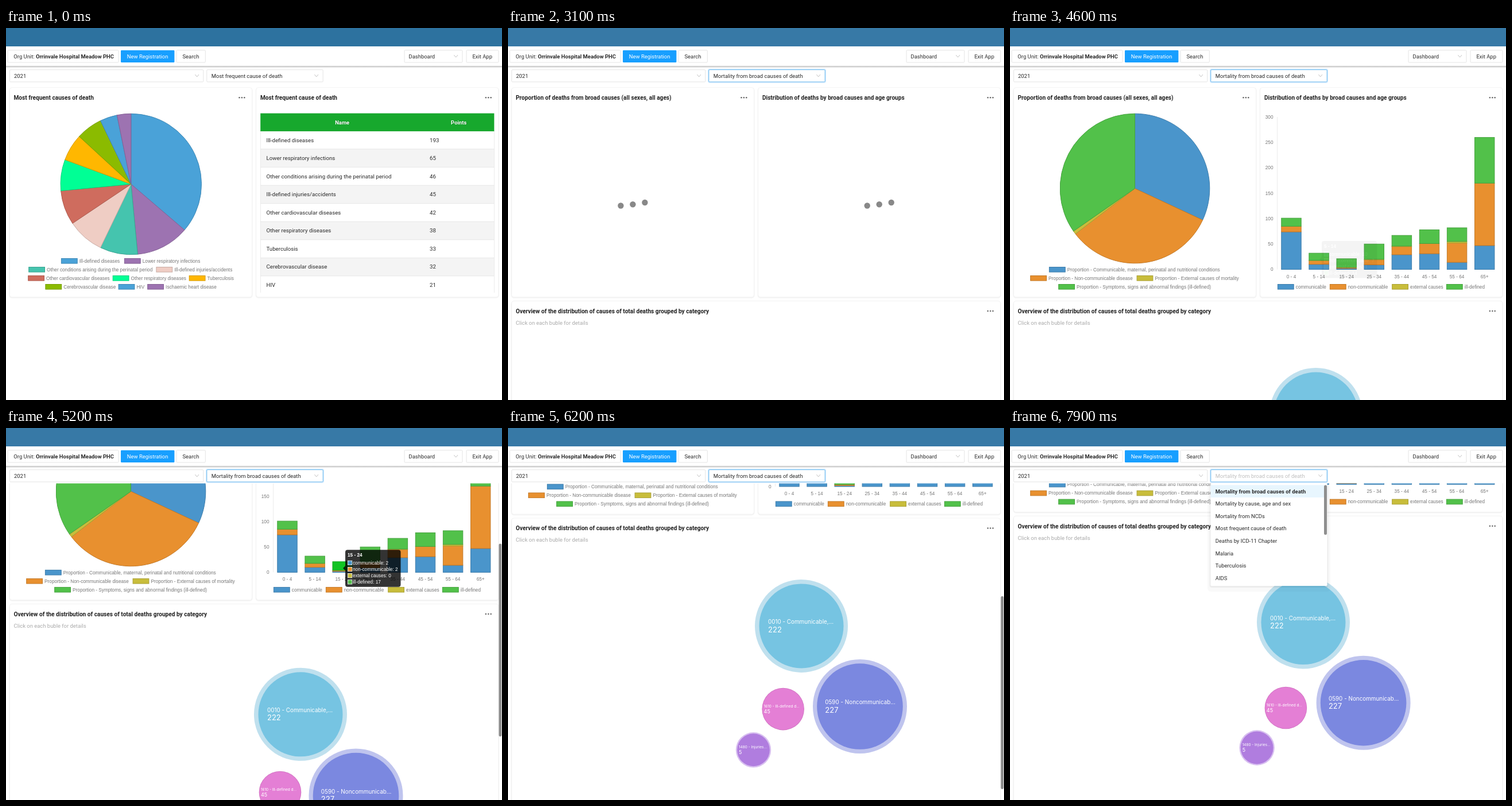
Animation of 864 by 648 pixels, one loop 8000 ms. Source, as an HTML page:

```html
<!DOCTYPE html>
<html lang="en">
<head>
<meta charset="utf-8">
<title>Dashboard</title>
<style>
html, body { margin: 0; width: 100%; height: 100%; overflow: hidden; background: #fff; }
svg { display: block; width: 864px; height: 648px; }
text { font-family: Roboto, sans-serif; font-size: 9.45px; fill: #2b2b2b; white-space: pre; }
.title { font-size: 10.15px; font-weight: 700; fill: #222; }
.cell { font-size: 9.7px; }
.chart { font-family: "Liberation Sans", Arial, sans-serif; font-size: 8.22px; fill: #777; }
.bubble { font-family: Inter, sans-serif; fill: #fff; }
.caption { font-family: Inter, sans-serif; font-size: 45.5px; font-weight: 800; letter-spacing: .2px; }
</style>
</head>
<body>
<svg id="stage" viewBox="0 0 864 648" xmlns="http://www.w3.org/2000/svg"></svg>
<script>
const LOOP = 8000;
const BLUE = '#4a95cb', ORANGE = '#e8902f', YELLOW = '#c8bd3b', GREEN = '#52c14a';
const SERIES = [BLUE, ORANGE, YELLOW, GREEN];
const NAMES = ['communicable', 'non-communicable', 'external causes', 'ill-defined'];
const CAUSES = [
  ['Ill-defined diseases', 193, '#4aa2d8'],
  ['Lower respiratory infections', 65, '#9d73b1'],
  ['Other conditions arising during the perinatal period', 46, '#45c4ae'],
  ['Ill-defined injuries/accidents', 45, '#efcdc4'],
  ['Other cardiovascular diseases', 42, '#cf6c5e'],
  ['Other respiratory diseases', 38, '#00ff95'],
  ['Tuberculosis', 33, '#ffb700'],
  ['Cerebrovascular disease', 32, '#8bbb00'],
  ['HIV', 21, '#4aa2d8'],
  ['Ischaemic heart disease', 17, '#9d73b1']
];
const AGES = [
  ['0 - 4', 74, 11, 0, 16], ['5 - 14', 10, 7, 1, 14],
  ['15 - 24', 2, 2, 0, 17], ['25 - 34', 9, 10, 1, 30],
  ['35 - 44', 29, 16, 1, 21], ['45 - 54', 31, 20, 0, 27],
  ['55 - 64', 14, 38, 3, 27], ['65+', 47, 123, 0, 90]
];
const OPTIONS = ['Mortality from broad causes of death', 'Mortality by cause, age and sex',
  'Mortality from NCDs', 'Most frequent cause of death', 'Deaths by ICD-11 Chapter',
  'Malaria', 'Tuberculosis', 'AIDS'];

const clamp = v => Math.max(0, Math.min(1, v));
const ramp = (t, a, b) => clamp((t - a) / (b - a));
const easeOut = k => 1 - Math.pow(1 - k, 4);
const settle = (t, from, tau) => Math.exp(-Math.max(0, t - from) / tau);

const rect = (x, y, w, h, fill, extra = '') =>
  `<rect x="${x}" y="${y}" width="${w}" height="${h}" fill="${fill}" ${extra}/>`;
const circle = (x, y, r, fill, extra = '') =>
  `<circle cx="${x}" cy="${y}" r="${r}" fill="${fill}" ${extra}/>`;
// y is the middle of the line
const text = (x, y, str, extra = '', size = 9.45) =>
  `<text x="${x}" y="${y + size * .355}" ${extra}>${str}</text>`;
const label = (x, y, str, extra = '') => text(x, y, str, 'class="chart" ' + extra, 8.22);
const edge = color => `style="stroke:color-mix(in srgb, ${color} 84%, black)" stroke-width="1"`;
const box = (x, y, w, h, stroke = '#e4e4e4') =>
  rect(x, y, w, h, '#fff', `stroke="${stroke}" rx="1.4"`);
const chevron = (x, y) =>
  `<path d="M${x - 3.3} ${y - 2}l3.3 4l3.3-4" fill="none" stroke="#bdbdbd" stroke-width=".9"/>`;
const dots = (x, y) => [-4.4, 0, 4.4].map(d => circle(x + d, y, 1.25, '#666')).join('');

function card(x, y, w, h, title) {
  return rect(x, y + 1, w, h, 'none', 'stroke="#f3f3f3" stroke-width="2" rx="4"') +
    rect(x, y, w, h, '#fff', 'stroke="#f0f0f0" stroke-width=".8" rx="4"') +
    text(x + 7.2, y + 17.8, title, 'class="title"', 10.15) + dots(x + w - 17.6, y + 17.6);
}

function legend(items) {
  return items.map(([x, y, color, name]) =>
    rect(x + .4, y - 4.3, 27.8, 8.6, color, edge(color)) + label(x + 31.8, y, name)).join('');
}

function pie(cx, cy, r, values, colors, k) {
  const unit = 2 * Math.PI * k / values.reduce((a, b) => a + b);
  const at = a => `${(cx + r * Math.sin(a)).toFixed(2)} ${(cy - r * Math.cos(a)).toFixed(2)}`;
  let a = 0, out = '';
  values.forEach((v, i) => {
    const b = a + v * unit;
    const d = `M${cx} ${cy}L${at(a)}A${r} ${r} 0 ${b - a > Math.PI ? 1 : 0} 1 ${at(b)}Z`;
    out += `<path d="${d}" fill="${colors[i]}" stroke-linejoin="bevel" ${edge(colors[i])}/>`;
    a = b;
  });
  return out;
}

function table() {
  let out = '';
  CAUSES.slice(0, 9).forEach(([name, points], i) => {
    const y = 179.5 + i * 31.56;
    out += rect(443.5, y, 407, 31.56, i % 2 ? '#f4f4f4' : '#fff', 'stroke="#e6e6e6" stroke-width=".8"') +
      text(453.5, y + 15.6, name, 'class="cell"', 9.7) + text(738, y + 15.6, points, 'class="cell"', 9.7);
  });
  const head = (x, str) => ['#0005', '#fff'].map((c, i) =>
    text(x + .8 - i * .8, 165 - i * .8, str,
      `text-anchor="middle" font-weight="700" style="fill:${c}"`)).join('');
  return `<g clip-path="url(#rows)">${out}</g>` +
    rect(443.2, 148.6, 407.2, 31.3, '#17a82d') +
    head(585.7, 'Name') + head(788.7, 'Points');
}

function topCauses() {
  const spots = [[96, 406], [206, 406], [39.3, 421], [261.5, 421], [38.3, 436],
    [185.8, 436], [318.8, 436], [68.5, 451], [195.7, 451], [246.3, 451]];
  return card(6.3, 103.7, 422.2, 365, 'Most frequent causes of death') +
    card(435.7, 103.7, 422.2, 365, 'Most frequent cause of death') +
    pie(217.8, 272, 122.7, CAUSES.map(c => c[1]), CAUSES.map(c => c[2]), 1) +
    legend(spots.map((s, i) => [s[0], s[1] - .2, CAUSES[i][2], CAUSES[i][0]])) + table();
}

function broadCards() {
  return card(6.3, 103.7, 422.2, 365, 'Proportion of deaths from broad causes (all sexes, all ages)') +
    card(435.7, 103.7, 422.2, 365, 'Distribution of deaths by broad causes and age groups') +
    card(6.3, 475.5, 851.6, 620, 'Overview of the distribution of causes of total deaths grouped by category') +
    text(13.5, 513.5, 'Click on each buble for details', 'style="fill:#aaa"');
}

function chartFrame() {
  let out = '<path d="M465.5 155V420.5" stroke="#e8e8e8" stroke-width=".8"/>';
  for (let v = 0; v <= 300; v += 50) out += label(458.5, 420.3 - v * .884, v, 'text-anchor="end"');
  AGES.forEach((a, i) => out += label(490 + 48.1 * i, 432.6, a[0], 'text-anchor="middle"'));
  return out + legend([
    [68, 420.8, BLUE, 'Proportion - Communicable, maternal, perinatal and nutritional conditions'],
    [35.3, 435.8, ORANGE, 'Proportion - Non-communicable disease'],
    [220.7, 435.8, YELLOW, 'Proportion - External causes of mortality'],
    [84.3, 450.8, GREEN, 'Proportion - Symptoms, signs and abnormal findings (ill-defined)'],
    [466, 450.8, BLUE, NAMES[0]], [557, 450.8, ORANGE, NAMES[1]],
    [665.3, 450.8, YELLOW, NAMES[2]], [760, 450.8, GREEN, NAMES[3]]
  ]);
}

function bars(k, hot) {
  let out = '';
  AGES.forEach(([, ...values], i) => {
    let y = 420.5;
    values.forEach((v, s) => {
      const h = v * .884 * k;
      y -= h;
      const fill = hot && i === 2 && s === 3 ? '#12c424' : SERIES[s];
      if (h) out += rect(472.8 + 48.1 * i, y, 34.4, h, fill, edge(fill));
    });
  });
  return out;
}

function tooltip(t) {
  const alpha = Math.pow(ramp(t, 4520, 4880), 2) * (1 - ramp(t, 5300, 5500));
  if (!alpha) return '';
  const k = easeOut(ramp(t, 4650, 5000)), x = 543 + 48 * k, y = 371 + 10.3 * k;
  const age = AGES[t < 4650 ? 1 : 2];
  const line = 'style="fill:#fff"';
  let out = rect(x, y, 96.5, 64.5, '#000', 'rx="4" opacity=".8"') +
    `<path d="M${x} ${y + 28}l-4 4l4 4z" opacity=".8"/>` +
    label(x + 4, y + 8.8, age[0], line + ' font-weight="700"');
  NAMES.forEach((name, i) => {
    const ly = y + 22.7 + 11.1 * i;
    out += rect(x + 4.4, ly - 3.7, 7.4, 7.4, SERIES[i], 'stroke="#fff" stroke-width=".8"') +
      label(x + 13, ly, `${name}: ${age[i + 1]}`, line);
  });
  return `<g opacity="${alpha}">${out}</g>`;
}

function bubble(x, y, r, ring, fill, halo, dx, name, count, small) {
  const [a, b, up, down] = small ? [6.45, 9, -5, 4.2] : [9.9, 13, -7.3, 6];
  const line = (dy, size, str) => text(x + dx, y + dy, str, `class="bubble" style="font-size:${size}px"`, size);
  return circle(x, y, ring, halo) + circle(x, y, r, fill) + line(up, a, name) + line(down, b, count);
}

function bubbles(t) {
  const late = tau => settle(t, 5200, tau);
  return bubble(511 + 22 * settle(t, 4600, 250), 660 + 13 * settle(t, 4600, 1200), 73.5, 81,
      '#76c4e2', '#bfe0ee', -58, '0010 - Communicable,...', 222) +
    bubble(617 - 7.5 * late(1600), 800.6 + 9 * late(900), 74.8, 82,
      '#7b88e0', '#bfc4ee', -60.7, '0590 - Noncommunicab...', 227) +
    bubble(481 - 3.5 * late(1500), 810 - 6.5 * late(800), 36, 36.8,
      '#e47fd5', '#cf72c0', -33.6, '1610 - Ill-defined d...', 45, true) +
    bubble(432 - 7.6 * late(1900), 879.3, 28.4, 30.7,
      '#b07ddf', '#d8bff0', -25.5, '1480 - Injuries...', 5, true);
}

function loaders(t) {
  let out = '';
  for (const cx of [217.4, 646.7]) for (let i = 0; i < 3; i++) {
    const y = 305 + 5 * Math.cos((t - 3100) * 2 * Math.PI / 900 - .45 - .66 * i);
    out += circle(cx + 21 * (i - 1), y, 5.2, '#888');
  }
  return out;
}

function scrollAt(t) {
  if (t < 5200) return 168.5 * Math.pow(ramp(t, 4800, 5200), 1.3);
  return 322.3 - 153.8 * Math.exp(-(t - 5200) / 270);
}

function toolbar() {
  return rect(0, 32, 864, 34.2, '#fff') +
    box(3, 38.7, 193, 21.3) +
    text(13.3, 49.3, 'Org Unit: <tspan font-weight="700">Orrinvale Hospital Meadow PHC</tspan>') +
    rect(200, 38.7, 93.4, 21.4, '#189fff', 'rx="1.4"') +
    text(246.6, 49.3, 'New Registration', 'text-anchor="middle" style="fill:#fff"') +
    box(297, 38.7, 50.3, 21.3) + text(322, 49.3, 'Search', 'text-anchor="middle"') +
    box(694, 38.7, 101, 21.3) + text(701.5, 49.3, 'Dashboard') + chevron(783.7, 49) +
    box(802, 38.7, 56, 21.3) + text(829.7, 49.3, 'Exit App', 'text-anchor="middle"') +
    rect(0, 66, 864, 4, 'url(#shade)') +
    box(6.5, 72.7, 337.3, 21.2) + text(14, 83.3, '2021') + chevron(332.7, 83);
}

function picker(focus, open, value) {
  return (focus ? rect(349, 72, 204, 22.6, 'none', 'stroke="#1890ff33" stroke-width="2" rx="2"') : '') +
    box(349.8, 72.7, 202.4, 21.2, focus ? '#6bb8ec' : '#e4e4e4') +
    text(357.8, 83.3, value, open ? 'style="fill:#bfbfbf"' : '') + chevron(540.7, 83);
}

function menu(k, selected, hover) {
  if (!k) return '';
  let out = rect(344, 98, 214, 187, '#000', 'rx="6" opacity=".025"') +
    rect(347.5, 96, 207, 182, '#000', 'rx="4" opacity=".05"') +
    rect(349.5, 96, 203, 179, '#fff', 'rx="1.4"');
  OPTIONS.forEach((name, i) => {
    const y = 110.2 + 21.6 * i, on = i === selected;
    if (on || i === hover) out += rect(349.5, y - 10.8, 203, 21.6, on ? '#e8f6fe' : '#f5f5f5');
    out += text(357.8, y, name, on ? 'font-weight="700"' : '');
  });
  out += rect(547, 99.5, 5, 86.5, '#8f8f8f', 'rx="2.5"');
  return `<g opacity="${k}" transform="translate(0 ${96 * .2 * (1 - k)}) scale(1 ${.8 + .2 * k})">${out}</g>`;
}

function caption() {
  const word = (dx, style) =>
    `<text class="caption" x="${242.5 + dx}" y="${604 + dx}" style="${style}">Built-in dashboard</text>`;
  return word(2.5, 'fill:#ccc;stroke:#ccc;stroke-width:2') +
    word(0, 'fill:#fff;stroke:#999;stroke-width:1.8');
}

const stage = document.getElementById('stage');
stage.innerHTML = `<defs>
  <clipPath id="view"><rect y="96.5" width="864" height="551.5"/></clipPath>
  <clipPath id="rows"><rect x="443" y="149" width="408" height="312"/></clipPath>
  <linearGradient id="shade" x2="0" y2="1">
    <stop stop-color="#000" stop-opacity=".25"/><stop offset="1" stop-color="#000" stop-opacity="0"/>
  </linearGradient></defs>
  ${rect(0, 0, 864, 648, '#fff')}
  <g clip-path="url(#view)"><g id="first">${topCauses()}</g>
  <g id="second">${broadCards()}<g id="frame">${chartFrame()}</g><g id="live"></g></g></g>
  ${rect(858.5, 0, 4.8, 336, '#8b8b8b', 'rx="2.4" id="thumb"')}
  ${rect(0, 0, 864, 32, '#3779a6', 'id="banner"')}
  ${toolbar()}<g id="picker"></g><g id="caption">${caption()}</g>`;
const part = id => stage.querySelector('#' + id);
const set = (id, name, value) => part(id).setAttribute(name, value);
const show = (id, on) => set(id, 'display', on ? 'inline' : 'none');

function draw(t) {
  const second = t >= 2900, loaded = t >= 3600, y = scrollAt(t);
  set('banner', 'fill', t < 100 ? '#2d729f' : '#3779a6');
  show('first', !second);
  show('second', second);
  show('frame', loaded);
  set('second', 'transform', `translate(0 ${-y})`);
  if (second) {
    const k = easeOut(ramp(t, 3600, 4600));
    part('live').innerHTML = loaded
      ? pie(217.5, 279.5, 130.3, [222, 227, 5, 241], SERIES, k) +
        bars(k, t > 4650 && t < 5400) + bubbles(t) + tooltip(t)
      : loaders(t);
  }
  set('thumb', 'y', 97.7 + y * .6133);
  set('thumb', 'opacity', ramp(t, 4780, 4880) * (1 - ramp(t, 6900, 7150)));

  const early = t < 4000;
  const open = early ? ramp(t, 1850, 2050) * (1 - ramp(t, 2450, 2600)) : ramp(t, 7500, 7700);
  part('picker').innerHTML = picker(t >= 1750, open > 0, OPTIONS[t < 2450 ? 3 : 0]) +
    menu(open, early ? 3 : 0, early && t > 2200 ? 0 : -1);
  set('caption', 'opacity', ramp(t, 1000, 1600) * (1 - ramp(t, 2150, 2600)));
}

const start = performance.now();
function tick() {
  draw((performance.now() - start) % LOOP);
  requestAnimationFrame(tick);
}
tick();
</script>
</body>
</html>
```
